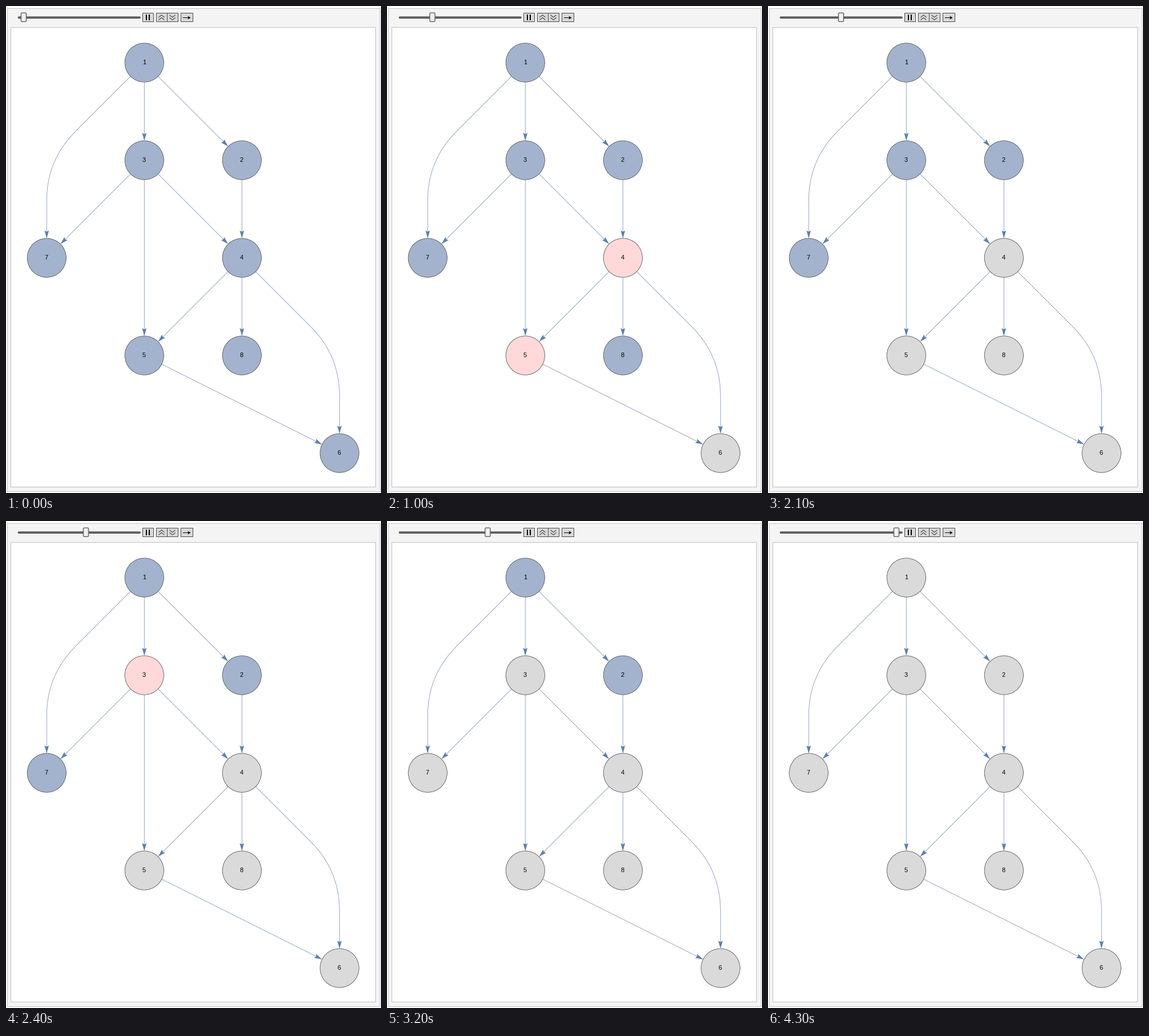
A matplotlib script for the animation above (4500 ms loop, 657 px wide and 853 px high).

```python
import matplotlib.pyplot as plt
import numpy as np
from matplotlib.animation import FuncAnimation
from matplotlib.patches import Circle, FancyBboxPatch, Polygon, Rectangle

plt.rcParams["path.snap"] = False

W, H, DPI = 657, 853, 64
PX = 72 / DPI  # points per pixel
TICK, TICKS = 100, 45
TICKS_PER_STATE = 2.73

UNSEEN, ACTIVE, DONE = "#a4b3cd", "#ffd9d9", "#dadada"
EDGE, HEAD = "#7d92b5", "#5f7fab"
R, STEP = 34.1, 171
ORIGIN = np.array([71.3, 99.1])

LAYOUT = [" 1  ",
          " 32 ",
          "7 4 ",
          " 58 ",
          "   6"]
CELL = {n: np.array([c, r]) for r, row in enumerate(LAYOUT)
        for c, n in enumerate(row) if n != " "}
CHILDREN = {"1": "732", "2": "4", "3": "754", "4": "586", "5": "6"}
ROOTS = "431"


def place(cell):
    return ORIGIN + STEP * np.asarray(cell)


def search_states():
    """Colours of all nodes after every enter or leave of a depth-first search."""
    color = dict.fromkeys(CELL, UNSEEN)
    states = [dict(color)]

    def visit(n):
        color[n] = ACTIVE
        states.append(dict(color))
        for child in CHILDREN.get(n, ""):
            if color[child] == UNSEEN:
                visit(child)
        color[n] = DONE
        states.append(dict(color))

    for root in ROOTS:
        visit(root)
    return states


STATES = search_states()

fig = plt.figure(figsize=(W / DPI, H / DPI), dpi=DPI, facecolor="white")
ax = fig.add_axes([0, 0, 1, 1])
ax.set_xlim(0, W)
ax.set_ylim(H, 0)
ax.axis("off")


def box(x, y, w, h, face, edge):
    ax.add_patch(Rectangle((x + 0.5, y + 0.5), w, h, fc=face, ec=edge, lw=PX))


def line(points, color, lw, z=1, cap="butt"):
    x, y = zip(*points)
    ax.plot(x, y, color=color, lw=lw * PX, zorder=z,
            solid_capstyle=cap, solid_joinstyle="miter")


def arrow_head(tip, d, length, half, color):
    tip, d = np.asarray(tip), np.asarray(d)
    back, side = tip - d * length, np.array([-d[1], d[0]]) * half
    ax.add_patch(Polygon([tip, back + side, tip - d * length * 0.85, back - side],
                         fc=color, ec="none", zorder=3))


def unit(v):
    return v / np.hypot(*v)


def draw_edge(a, b):
    p, q = place(CELL[a]), place(CELL[b])
    cols, rows = CELL[b] - CELL[a]
    curve = []
    if rows > abs(cols) > 0:  # one diagonal step, then straight down
        bend = place([CELL[b][0], CELL[a][1] + abs(cols)])
        start, end = unit(bend - p), unit(q - bend)
        s, e = bend - start * 71, bend + end * 71
        curve = [(1 - t) ** 2 * s + 2 * t * (1 - t) * bend + t * t * e
                 for t in np.linspace(0, 1, 17)]
    else:
        start = end = unit(q - p)
    tip = q - end * R
    line([p + start * R, *curve, tip - end * 10], EDGE, 0.8, 2)
    arrow_head(tip, end, 13.7, 3.9, HEAD)


def draw_controls():
    for color, lw in (("#3c3c3c", 3.6), ("#757575", 1.4)):
        line([(22.5, 20.2), (234, 20.2)], color, lw, cap="round")
    for x, w in ((239, 19), (263, 19), (282, 19), (306, 21)):
        box(x, 12, w, 15, "#d9d9d9", "#4a4a4a")
    for x in (245, 250):
        ax.add_patch(Rectangle((x, 15), 2, 10, fc="black", ec="none"))
    for x, way in ((272.5, 1), (291.5, -1)):
        for y in (17.8, 22.4):
            line([(x - 5, y + 2 * way), (x, y - 2 * way), (x + 5, y + 2 * way)],
                 "#222222", 0.9)
    line([(310, 20.5), (320, 20.5)], "black", 1)
    arrow_head((323.5, 20.5), (1, 0), 5, 3, "black")


def draw_node(n):
    x, y = place(CELL[n])
    ax.text(x - 0.5, y - 0.5, n, family="Liberation Sans", size=11 * PX,
            color="black", ha="center", va="center", zorder=5)
    return ax.add_patch(Circle((x, y), R, fc=UNSEEN, ec="#4c5054",
                               lw=0.8 * PX, zorder=4))


def thumb_part(w, h, face, edge):
    return ax.add_patch(FancyBboxPatch(
        (0, 19.7 - h / 2), w, h, boxstyle="round,pad=0,rounding_size=2",
        fc=face, ec=edge, lw=1.1 * PX, zorder=6))


box(2, 4, 653, 846, "#f4f4f4", "#c3c3c3")
box(8, 37, 639, 805, "white", "#c0c0c0")
draw_controls()
for a, targets in CHILDREN.items():
    for b in targets:
        draw_edge(a, b)
nodes = {n: draw_node(n) for n in CELL}
thumb = [thumb_part(9.4, 15.5, "#dadada", "#505050"),
         thumb_part(5, 12.4, "#f2f2f2", "none")]


def update(tick):
    k = int((tick + 1.2) / TICKS_PER_STATE)
    for n, circle in nodes.items():
        circle.set_facecolor(STATES[k][n])
    for part in thumb:
        part.set_x(31 + 12.12 * k - part.get_width() / 2)
    return [*nodes.values(), *thumb]


anim = FuncAnimation(fig, update, frames=TICKS, interval=TICK,
                     repeat=True, repeat_delay=0, blit=False)
plt.show()
```
